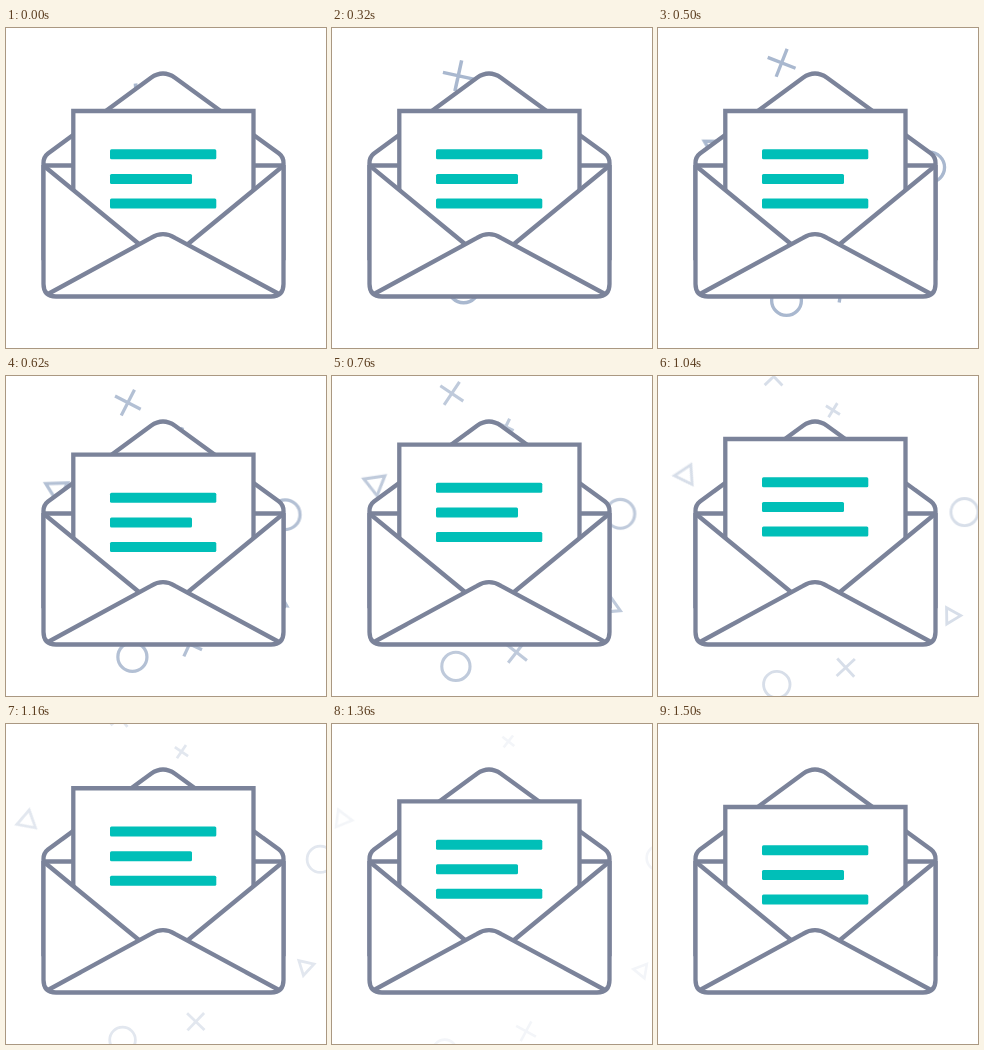
Write an HTML page that moves like this. It is 320 by 320 pixels and loops after 2.02 s.

```html
<!DOCTYPE html>
<html lang="en">
<head>
<meta charset="utf-8">
<title>Opening letter</title>
<style>
  html, body { margin: 0; width: 100%; height: 100%; overflow: hidden; background: #fff; }
  svg { display: block; width: 100%; height: 100%; }
</style>
</head>
<body>
<svg viewBox="0 0 320 320">
  <g id="confetti" fill="none" stroke="#a9b8cf"></g>
  <g fill="#fff" stroke="#7b839a" stroke-width="4.3">
    <path d="M37.5 138V135Q37.5 129 42 125.5L145 49.7Q157 41.3 169 49.7L273 125.5Q277.5 129 277.5 135V138V230H37.5Z"/>
    <path d="M37.5 137.5H277.5"/>
    <g id="letter">
      <path d="M67.3 240V83H247.5V240"/>
      <g fill="#00bfb8" stroke="none">
        <rect x="104" y="121.2" width="106.3" height="10" rx="1.5"/>
        <rect x="104" y="145.9" width="82" height="10" rx="1.5"/>
        <rect x="104" y="170.4" width="106.3" height="10" rx="1.5"/>
      </g>
    </g>
    <path stroke="none" d="M37.5 138L133 216L157 206L182 216L277.5 138V257L266 268.5H49L37.5 257Z"/>
    <path fill="none" d="M38 138L133 216M277 138L182 216"/>
    <path d="M42 266L145 209.8Q157 202.5 169 209.8L273 266"/>
    <path fill="none" d="M37.5 137V256Q37.5 268.5 50 268.5H265Q277.5 268.5 277.5 256V137"/>
  </g>
</svg>
<script>
const LOOP = 2020, END = 1500, KNOT = 700;

const shapes = {
  cross: 'M-1 0H1M0-1V1',
  ring: 'M1 0A1 1 0 1 1-1 0A1 1 0 1 1 1 0Z',
  triangle: 'M1 0L-.5 .866V-.866Z'
};

// Each property holds its values at 0, 700 and 1400 ms.
const pieces = [
  { shape: 'cross', x: [131, 120.7, 110.4], y: [72.5, 21.4, -18.9], size: [17, 14.1, 10.8], turn: [-5, 31, 60] },
  { shape: 'cross', x: [170.2, 173.4, 176.5], y: [105, 54.6, 15.5], size: [10.5, 9, 7.5], turn: [10, 25, 39] },
  { shape: 'cross', x: [186, 184, 195], y: [227, 272.7, 309], size: [14.5, 13.5, 11], turn: [-106, 33, 24] },
  { shape: 'triangle', x: [85, 46.6, 8], y: [155, 110, 95], size: [13.5, 12.4, 10], turn: [67, 85, 0] },
  { shape: 'triangle', x: [240, 276, 311.5], y: [189, 228, 247], size: [11.3, 10.2, 8.2], turn: [10, 28, -58] },
  { shape: 'ring', x: [238.5, 284.3, 329.7], y: [142, 138.2, 133.7], size: [16.8, 14.6, 12.4], turn: [0, 0, 0] },
  { shape: 'ring', x: [137, 125, 112], y: [235, 286.3, 330], size: [16.2, 14.3, 12], turn: [0, 0, 0] }
];

const confetti = document.getElementById('confetti');
const letter = document.getElementById('letter');

for (const piece of pieces) {
  piece.node = document.createElementNS(confetti.namespaceURI, 'path');
  piece.node.setAttribute('d', shapes[piece.shape]);
  confetti.append(piece.node);
}

const clamp = v => Math.min(1, Math.max(0, v));
const smooth = v => v * v * (3 - 2 * v);

// Parabola through three equally spaced values.
const curve = ([a, b, c], u) => a + (b - a) * u + (c - 2 * b + a) / 2 * u * (u - 1);

function draw(now) {
  const t = now % LOOP;
  const u = Math.min(t, END) / KNOT;

  const lift = 20 * (smooth(clamp((t - 500) / 400)) - smooth(clamp((t - 1100) / 400)));
  letter.setAttribute('transform', `translate(0 ${-lift})`);

  confetti.setAttribute('opacity', clamp((END - t) / 1000));
  for (const { node, x, y, size, turn } of pieces) {
    const scale = curve(size, u);
    node.setAttribute('transform',
      `translate(${curve(x, u)} ${curve(y, u)}) rotate(${curve(turn, u)}) scale(${scale})`);
    node.setAttribute('stroke-width', (3.8 - 0.0009 * t) / scale);
  }
}

const start = performance.now();
function tick() {
  draw(performance.now() - start);
  requestAnimationFrame(tick);
}
tick();
</script>
</body>
</html>
```
